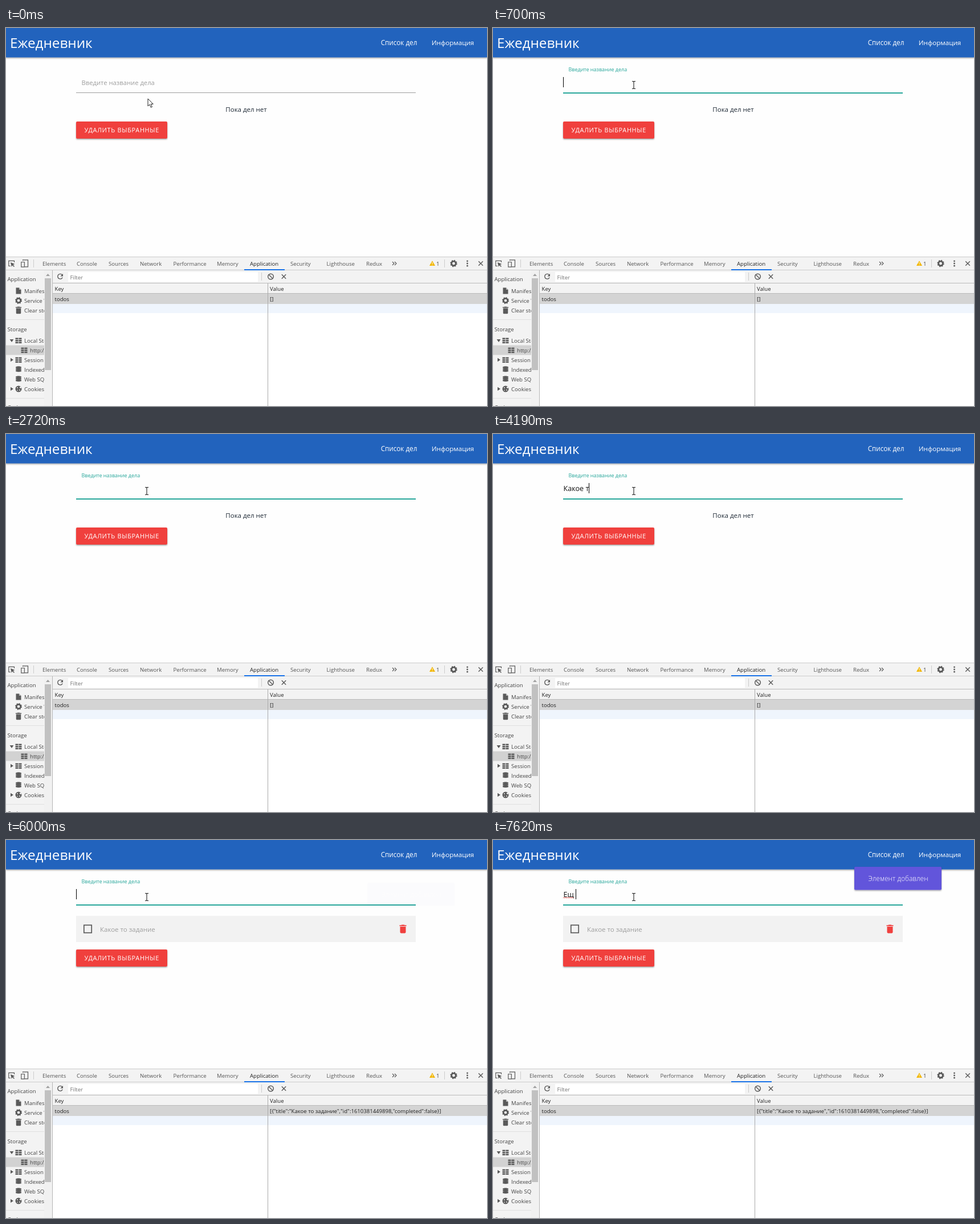
An HTML page that plays this animation: 844 by 663 pixels, repeating every 8 s.

```html
<!DOCTYPE html>
<html lang="ru">
<head>
<meta charset="utf-8">
<title>Ежедневник</title>
<style>
  html, body { margin: 0; width: 100%; height: 100%; overflow: hidden; background: #fefefe; }
  svg { display: block; font-family: "Open Sans", "Noto Sans", sans-serif; }
  text { white-space: pre; }
</style>
</head>
<body>
<svg id="stage" width="844" height="663" viewBox="0 0 844 663"></svg>
<script>
const LOOP = 8000;
const INK = '#5a5a5a';

const rect = (x, y, w, h, fill, extra = '') =>
  `<rect x="${x}" y="${y}" width="${w}" height="${h}" fill="${fill}" ${extra}/>`;
const text = (x, y, size, fill, str, extra = '') =>
  `<text x="${x}" y="${y}" font-size="${size}" fill="${fill}" ${extra}>${str}</text>`;
const line = (d, color = INK, width = 1.4, extra = '') =>
  `<path d="${d}" fill="none" stroke="${color}" stroke-width="${width}" ${extra}/>`;
const shape = (d, fill = INK, extra = '') => `<path d="${d}" fill="${fill}" ${extra}/>`;
const dot = (x, y, r, fill = INK) => `<circle cx="${x}" cy="${y}" r="${r}" fill="${fill}"/>`;
const at = (x, y, body) => `<g transform="translate(${x} ${y})">${body}</g>`;
const small = (x, y, str, fill = '#444', extra = '') => text(x, y, 9.6, fill, str, extra);
const middle = 'text-anchor="middle"';

// Icons are centred on their own origin.
const gear = r => {
  const teeth = Math.PI * 2 * r * 0.8 / 16;
  return `<circle r="${r * 0.62}" fill="none" stroke="${INK}" stroke-width="${r * 0.45}"/>` +
    `<circle r="${r * 0.8}" fill="none" stroke="${INK}" stroke-width="${r * 0.4}" stroke-dasharray="${teeth}"/>`;
};
const trash = fill =>
  rect(-6, -6.6, 12, 1.7, fill) + rect(-2.6, -7.4, 5.2, 1.5, fill) +
  shape('M-5 -4H5V5.6Q5 7.4 3.4 7.4H-3.4Q-5 7.4 -5 5.6Z', fill);
const cross = r => line(`M${-r} ${-r}L${r} ${r}M${r} ${-r}L${-r} ${r}`);
const page = shape('M-4.5 -5.5H1L4.5 -2V5.5H-4.5Z') + shape('M1 -5.5V-2H4.5Z', '#bbb');
const grid = [-4.5, -1, 2.5].map(y => rect(-5.5, y, 5, 2.6, INK) + rect(0.4, y, 5.1, 2.6, INK)).join('');
const database = [-3.6, -0.6, 2.4].map(y =>
  shape(`M-5 ${y - 1}Q0 ${y - 3.4} 5 ${y - 1}V${y + 1}Q0 ${y + 3} -5 ${y + 1}Z`) +
  line(`M-5 ${y + 1.4}Q0 ${y + 3.4} 5 ${y + 1.4}`, '#f3f3f3', 0.8)).join('');
const cookie = dot(0, 0, 5.5) + dot(-2, -2, 1, '#f3f3f3') + dot(2, 2, 1, '#f3f3f3') +
  dot(-2, 2.4, 0.8, '#f3f3f3') + dot(3.4, -2.6, 1.5, '#f3f3f3');
const arrowRight = shape('M-2 -3.2L3 0L-2 3.2Z');
const arrowDown = shape('M-3.4 -2H3.4L0 3Z');

function appPage() {
  return rect(0, 0, 844, 402, '#fefefe') +
    rect(0, 0, 844, 51.5, '#2264bd', 'filter="url(#shadow)"') +
    text(7, 35, 24.3, '#fff', 'Ежедневник') +
    text(689.5, 29.5, 11.7, '#fff', 'Список дел', middle) +
    text(784, 29.5, 11.6, '#fff', 'Информация', middle) +
    rect(123, 113, 596, 1, '#9e9e9e') +
    rect(123, 113, 596, 2, '#26a69a', 'id="underline"') +
    text(0, 0, 11.25, '#9e9e9e', 'Введите название дела', 'id="label"') +
    text(123.5, 100, 12.6, '#111', '', 'id="typed"') +
    line('M123 102' + 'l1.5 -1.5l1.5 1.5'.repeat(6), '#e53935', 0.9, 'id="squiggle"') +
    rect(123, 86, 1, 18, '#000', 'id="caret"') +
    text(421.5, 146.5, 11.5, '#1f2a36', 'Пока дел нет', middle + ' id="empty"') +
    `<g id="item">` +
      rect(123, 133, 596, 46, '#f2f2f2') +
      rect(136.8, 149.3, 13.4, 13.4, 'none', 'stroke="#5a5a5a" stroke-width="1.7"') +
      text(165, 161, 11.5, '#9e9e9e', 'Какое то задание') +
      at(696.5, 156, trash('#f0403e')) +
    `</g>` +
    `<g id="button">` +
      rect(123, 164, 160, 30, '#f0403e', 'rx="2" filter="url(#shadow)"') +
      text(203.3, 183, 10.9, '#fff', 'УДАЛИТЬ ВЫБРАННЫЕ', middle + ' letter-spacing=".7"') +
    `</g>` +
    `<g id="toast">` +
      rect(634, 47, 153, 40.5, '#6254db', 'rx="2" filter="url(#shadow)"') +
      text(711, 72.3, 12, '#fff', 'Элемент добавлен', middle + ' font-weight="300"') +
    `</g>` +
    rect(122.5, 115.5, 0, 0, '#fff', 'id="popup" stroke="#c6c6c6"');
}

function toolbar() {
  const tabs = [[64, 'Elements'], [124, 'Console'], [180, 'Sources'], [235, 'Network'],
    [293.5, 'Performance'], [370, 'Memory'], [428, 'Application'], [499, 'Security'],
    [562.5, 'Lighthouse'], [632, 'Redux']];
  return rect(0, 402, 844, 23, '#f3f3f3') + rect(0, 401, 844, 1, '#cacaca') +
    rect(0, 424, 844, 1, '#ccc') + rect(418, 423, 71, 2, '#1a73e8') +
    tabs.map(([x, name]) => small(x, 417, name, name === 'Application' ? '#222' : '#555')).join('') +
    line('M8 417.5H4.8V408.3H14.5V411', INK, 1.2) + shape('M8 411L15.5 414L12.4 415.2L15 418L13.8 419L11.2 416.3L9.8 419Z') +
    line('M29.5 408V406.8H38.5V418.8H33M26.8 410.5H32.3V419.2H26.8Z', INK, 1.2) +
    [48, 769].map(x => rect(x, 406, 1, 14, '#ccc')).join('') +
    line('M678 410L681 413L678 416M682 410L685 413L682 416', INK, 1.2) +
    shape('M748 408.3L753 417H743Z', '#f2b600') + rect(747.5, 411, 1, 3, '#fff') + rect(747.5, 415, 1, 1, '#fff') +
    small(755, 417, '1') + at(785.5, 413, gear(6.2)) +
    [408.8, 413, 417.2].map(y => dot(809.5, y, 1.4)).join('') + at(833, 413, cross(3.8));
}

function sidebar() {
  const rows = [[461, 22, page, 'Manifest'], [478, 22, gear(6), 'Service Workers'],
    [495, 22, `<g transform="scale(.85)">${trash(INK)}</g>`, 'Clear storage'],
    [548, 22, grid, 'Local Storage', arrowDown], [565, 32, grid, 'http://localhost:3000'],
    [582, 22, grid, 'Session Storage', arrowRight], [599, 22, database, 'IndexedDB'],
    [616, 22, database, 'Web SQL'], [633, 22, cookie, 'Cookies', arrowRight]];
  return rect(0, 425, 81, 238, '#f3f3f3') +
    `<g clip-path="url(#side)">` + rect(0, 556.5, 67, 17, '#d2d2d2') +
    [[444, 'Application'], [531.5, 'Storage'], [669, 'Cache']].map(([y, s]) => small(2.5, y, s)).join('') +
    rows.map(([y, x, icon, name, arrow]) =>
      at(x, y, icon) + small(x + 10, y + 3.6, name) + (arrow ? at(10, y, arrow) : '')).join('') +
    rect(0, 511, 67, 1, '#e0e0e0') + rect(0, 649, 67, 1, '#e0e0e0') + `</g>` +
    rect(67, 425, 14, 238, '#f1f1f1') + rect(68, 439, 11, 161, '#c1c1c1') +
    shape('M70 435H77L73.5 431Z', '#a0a0a0') + rect(81, 425, 1, 238, '#b5b5b5');
}

function storageTable() {
  return rect(82, 425, 762, 23, '#f3f3f3') + rect(109, 428, 333, 17, '#fff') +
    line('M98.6 433A4.4 4.4 0 1 0 99.2 437.5', INK, 1.4) + shape('M100 431V435.6H95.4Z') +
    small(112.5, 440.7, 'Filter', '#757575') + rect(448, 429, 1, 14, '#ccc') +
    `<circle cx="464.5" cy="436" r="4.8" fill="none" stroke="${INK}" stroke-width="1.5"/>` +
    line('M461 432.6L468 439.4') + at(487.5, 436, cross(3.7)) +
    rect(82, 448, 762, 18, '#f3f3f3') + rect(82, 447, 762, 1, '#bbb') +
    rect(82, 466, 762, 18, '#d4d4d4') + rect(82, 465, 762, 1, '#bbb') +
    rect(82, 484, 762, 16, '#eff5fd') + rect(82, 500, 762, 163, '#fff') +
    rect(459, 448, 1, 215, '#aaa') +
    small(85.5, 461, 'Key', '#222') + small(463, 461, 'Value', '#222') +
    small(85.5, 479, 'todos', '#222') + text(463, 479, 9.55, '#222', '', 'id="value"');
}

const pointers =
  `<g id="arrow">` + shape('M0 0V13L3 10.2L5.2 15.3L7.4 14.3L5.2 9.4H9.2Z', '#fff', 'stroke="#222" stroke-width="1"') + `</g>` +
  `<g id="beam">` + line('M-3 -6.5H-1L0 -5.5L1 -6.5H3M0 -5.5V5.5M-3 6.5H-1L0 5.5L1 6.5H3', '#222', 1.1) + `</g>`;

const stage = document.getElementById('stage');
stage.innerHTML =
  `<defs><filter id="shadow" x="-10%" y="-20%" width="120%" height="160%">` +
  `<feDropShadow dx="0" dy="1.4" stdDeviation="1.1" flood-color="#000" flood-opacity=".38"/></filter>` +
  `<clipPath id="side"><rect x="0" y="425" width="67" height="238"/></clipPath></defs>` +
  appPage() + toolbar() + sidebar() + storageTable() + pointers;

const el = {};
stage.querySelectorAll('[id]').forEach(node => { el[node.id] = node; });

const TASK = 'Какое то задание';
const keyTimes = [3020, 3230, 3410, 3530, 3790, 3940, 4190, 4250, 4310, 4620, 4740, 4980, 5040, 5260, 5440, 5560];
const typing = [[0, ''], [1570, 'R'], [1900, 'Rf'], [2080, 'Rfr'], [2200, 'Rfrj'], [2410, ''],
  ...keyTimes.map((time, i) => [time, TASK.slice(0, i + 1)]),
  [6000, ''], [7090, 'Е'], [7370, 'Ещ'], [7560, 'Ещ ']];
const caretOn = [[0, false], [490, true], [1000, false], [1570, true], [2720, false],
  [3020, true], [6520, false], [7030, true]];
const popupSize = [[0, null], [1690, [388, 107]], [1900, null], [3070, [164, 47]], [3230, null]];
const pointerPath = [[0, [249, 124]], [60, [246, 117]], [120, [242, 107]],
  [180, [241, 100]], [240, [244, 99]], [300, [247, 100]]];

const current = (track, t) => track.filter(([time]) => time <= t).pop()[1];
const progress = (t, start, length) => Math.min(1, Math.max(0, (t - start) / length));
const easeOut = (p, power) => 1 - (1 - p) ** power;
const show = (node, visible) => node.setAttribute('visibility', visible ? 'visible' : 'hidden');
const move = (node, x, y, scale = 1) => node.setAttribute('transform', `translate(${x} ${y}) scale(${scale})`);
const blend = (from, to, p) => `rgb(${from.map((c, i) => Math.round(c + (to[i] - c) * p))})`;

function render(t) {
  const [px, py] = current(pointerPath, t);
  const overInput = py < 114;
  show(el.arrow, !overInput);
  show(el.beam, overInput);
  move(overInput ? el.beam : el.arrow, px, py);

  const focus = easeOut(progress(t, 490, 200), 2);
  move(el.label, 132.5, 100 - 24.5 * focus, 1 - 0.2 * focus);
  el.label.setAttribute('fill', blend([158, 158, 158], [38, 166, 154], focus));
  el.underline.setAttribute('opacity', focus);

  const typed = current(typing, t);
  el.typed.textContent = typed;
  el.caret.setAttribute('x', Math.round(123 + (typed ? el.typed.getComputedTextLength() : 0)));
  show(el.caret, current(caretOn, t));
  show(el.squiggle, t >= 7620);

  const size = current(popupSize, t);
  show(el.popup, size);
  if (size) {
    el.popup.setAttribute('width', size[0]);
    el.popup.setAttribute('height', size[1]);
  }

  const added = t >= 6000;
  show(el.empty, !added);
  show(el.item, added);
  move(el.button, 0, added ? 28 : 0);
  el.value.textContent = added ? `[{"title":"${TASK}","id":1610381449898,"completed":false}]` : '[]';

  const toast = easeOut(progress(t, 6000, 300), 3);
  move(el.toast, 0, 28 * (1 - toast));
  el.toast.setAttribute('opacity', toast);
}

const start = performance.now();
function tick() {
  render((performance.now() - start) % LOOP);
  requestAnimationFrame(tick);
}
tick();
</script>
</body>
</html>
```
